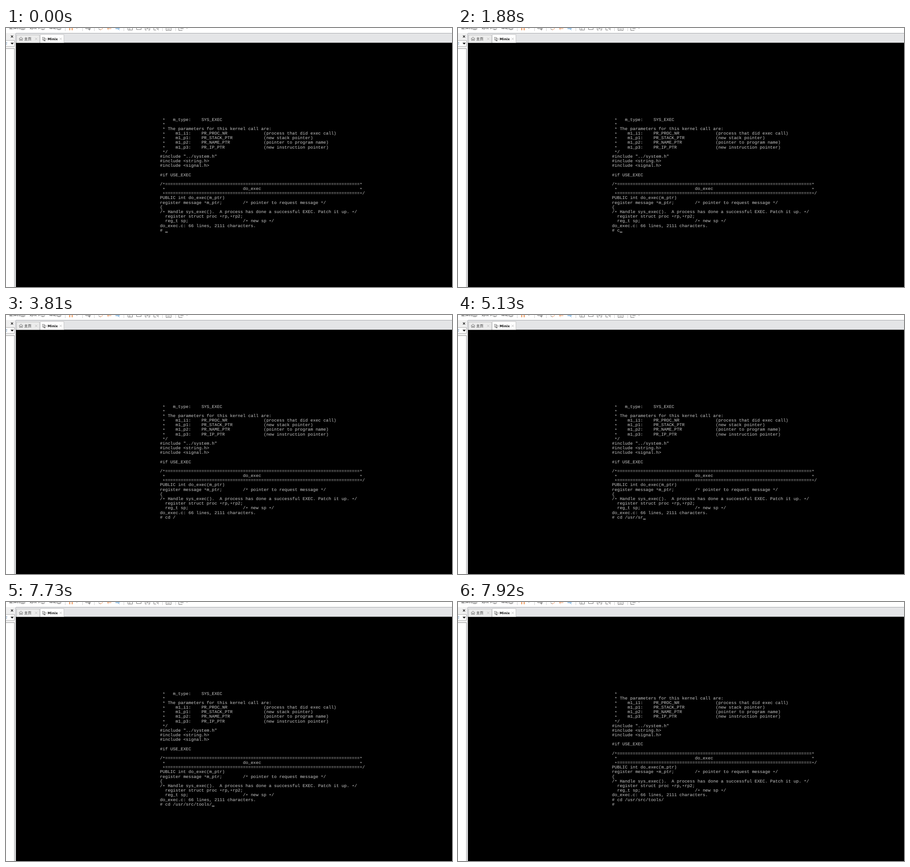
An HTML page for the animation above (8 s loop, 982 by 571 pixels).

```html
<!DOCTYPE html>
<html lang="zh">
<head>
<meta charset="utf-8">
<title>Terminal</title>
<style>
  html, body { margin: 0; width: 100%; height: 100%; overflow: hidden; background: #000; }
  svg { display: block; width: 100vw; height: 100vh; }
  text { white-space: pre; text-rendering: geometricPrecision; }
  #screen text { font: 9.525px "Liberation Mono", monospace; fill: #c8c8c8; }
  .ui { font: 8px "Noto Sans CJK SC", "Noto Sans CJK", sans-serif; fill: #222; }
  .tab { font: bold 7.6px "DejaVu Sans", sans-serif; fill: #111; }
  .line { fill: none; stroke: #777; stroke-width: 1; }
  .sep { stroke: #d0d0d0; }
  .orange { stroke: #ee9a62; }
  .blue { stroke: #3f8fd2; }
  .close { stroke: #bbb; }
</style>
</head>
<body>
<svg viewBox="0 0 982 571" preserveAspectRatio="none">
  <rect width="982" height="571"/>

  <!-- toolbar -->
  <rect width="982" height="12" fill="#fff"/>
  <g class="ui">
    <text x="7" y="2">虚拟机(<tspan text-decoration="underline">M</tspan>)</text>
    <text x="52" y="2">选项卡(<tspan text-decoration="underline">T</tspan>)</text>
    <text x="95" y="2">帮助(<tspan text-decoration="underline">H</tspan>)</text>
  </g>
  <path class="line sep" d="M130.500 0v7M168.500 0v7M194.500 0v7M259.500 0v7M344.500 0v7M373.500 0v7"/>
  <path d="M139 0h2.500v5h-2.500zM144.500 0h2.500v5h-2.500z" fill="#f0a46e"/>
  <path d="M154.500 0h3l-1.500 1.200zM397 0h3l-1.500 1.200z" fill="#777"/>
  <path class="line" d="M175.500 0v1.500h10V0M181 3h5M183.500 1v4.500M204 1q1 3 4 3"/>
  <path class="line orange" d="M207 4q5 0 5.500-4M223 1.500h9M226 0l-3 1.500 3 3"/>
  <path class="line blue" stroke-width="1.500" d="M241 1.500h6l4-1.500M246 1.500l4 3"/>
  <path class="line" d="M268.500 0v4.500h10V0M272.500 0v4M287.500 0v3.500h10V0M306.500 0v4.500h3M316.500 0v4.500h-3M309 1.500h5M325.500 0v4.500h5M331 0l5 5M335 0v3M352.500 0v5.500h11V0M355 2.500h6M380.500 0v5.500h8M384 1.500h7"/>

  <!-- tab strip -->
  <rect y="11" width="982" height="21.500" fill="#e4e5e7"/>
  <path class="line" stroke="#aaa" d="M20 11.500h962" style="stroke:#a5a8ab"/>
  <rect x="23.500" y="15.500" width="50" height="17" fill="#ececec" stroke="#c4c4c4"/>
  <rect x="75.500" y="14.500" width="52" height="18" fill="#fff" stroke="#c4c4c4"/>
  <path class="line" d="M28.500 24l4.500-4 4.500 4M30 23v4.500h2v-3h2v3h2V23"/>
  <path class="line" d="M83 20.500h-2.500v6h2M83.500 22v6.500h4"/>
  <path d="M84 21l5 3.500-5 3.500z" fill="#fff" stroke="#555" stroke-width=".9"/>
  <text class="ui" x="40" y="27">主页</text>
  <text class="tab" x="91.500" y="26.800" style="font-size:7.400px">Minix</text>
  <path class="line close" d="M64 21.500l5 5m0-5l-5 5M118 21.500l5 5m0-5l-5 5"/>

  <!-- side panel -->
  <rect y="11" width="22" height="560" fill="#e9e9eb"/>
  <rect y="11" width="19" height="35" fill="#f0f0f0"/>
  <path class="line" style="stroke:#222;stroke-width:1.200" d="M11 16.500l4.500 4.500m0-4.500l-4.500 4.500"/>
  <rect x="-2" y="27.500" width="20.500" height="13" fill="#fff" stroke="#b0b0b0"/>
  <text class="ui" x="-5" y="37" style="fill:#6a8fb5">索</text>
  <path d="M10 32.500h7l-3.500 4z" fill="#111"/>
  <rect x="-2" y="45.500" width="20.500" height="527" fill="#fff" stroke="#9a9a9a"/>
  <path class="line" style="stroke:#b4b6b8" d="M21.500 12v559"/>

  <g id="screen"></g>
  <rect id="cursor" y="449.300" width="5.700" height="1.400" fill="#c8c8c8"/>
</svg>
<script>
const LOOP = 8000, ENTER = 7860;
const LEFT = 339, TOP = 197, COL = 5.715, ROW = 10.17, BASE = 7.6;

const at = (text, col, rest) => text.padEnd(col) + rest;
const param = (name, reg, note) => at(` *    ${name}:    ${reg}`, 40, `(${note})`);
const bar = '='.repeat(75);

const listing = [
  ' *   m_type:    SYS_EXEC',
  ' *',
  ' * The parameters for this kernel call are:',
  param('m1_i1', 'PR_PROC_NR', 'process that did exec call'),
  param('m1_p1', 'PR_STACK_PTR', 'new stack pointer'),
  param('m1_p2', 'PR_NAME_PTR', 'pointer to program name'),
  param('m1_p3', 'PR_IP_PTR', 'new instruction pointer'),
  ' */',
  '#include "../system.h"',
  '#include <string.h>',
  '#include <signal.h>',
  '',
  '#if USE_EXEC',
  '',
  `/*${bar}*`,
  at(at(' *', 32, 'do_exec'), 77, '*'),
  ` *${bar}*/`,
  'PUBLIC int do_exec(m_ptr)',
  at('register message *m_ptr;', 32, '/* pointer to request message */'),
  '{',
  '/* Handle sys_exec().  A process has done a successful EXEC. Patch it up. */',
  '  register struct proc *rp,*rp2;',
  at('  reg_t sp;', 32, '/* new sp */'),
  'do_exec.c: 66 lines, 2111 characters.'
];

const command = 'cd /usr/src/tools/';
const keys = [1880, 2080, 2210, 2670, 4140, 4270, 4340, 4800, 4930,
  5130, 5260, 5660, 6200, 6600, 6730, 6930, 7000, 7340];
// The cursor starts visible and flips at each of these times.
const blinks = [200, 410, 610, 880, 1080, 1280, 1530, 1810, 2010, 2210,
  2470, 2670, 2930, 3130, 3400, 3600, 3810, 4080, 4340, 4540, 4740, 5000,
  5200, 5460, 5660, 5870, 6130, 6330, 6530, 6800, 7070, 7270, 7530, 7730, 7920];

const svg = (tag, parent) =>
  parent.appendChild(document.createElementNS('http://www.w3.org/2000/svg', tag));
const screen = document.getElementById('screen');
const cursor = document.getElementById('cursor');
const rows = Array.from({ length: 25 }, (_, i) => {
  const row = svg('text', screen);
  row.setAttribute('x', LEFT);
  row.setAttribute('y', TOP + i * ROW + BASE);
  return row;
});

// Asterisks sit at mid-height in the console font.
function write(row, line) {
  if (row.line === line) return;
  row.line = line;
  row.textContent = '';
  let low = 0;
  for (const part of line.split(/(\*+)/).filter(Boolean)) {
    const drop = part[0] === '*' ? 1.5 : 0;
    const span = svg('tspan', row);
    span.setAttribute('dy', drop - low);
    span.textContent = part;
    low = drop;
  }
}

const passed = (times, t) => times.filter(time => time <= t).length;

function draw(t) {
  const done = t >= ENTER;
  const typed = '# ' + command.slice(0, passed(keys, t));
  const lines = done ? [...listing.slice(1), typed, '# '] : [...listing, typed];
  rows.forEach((row, i) => write(row, lines[i]));
  cursor.setAttribute('x', LEFT + lines[24].length * COL);
  cursor.setAttribute('visibility', passed(blinks, t) % 2 ? 'hidden' : 'visible');
}

const start = performance.now();
function tick() {
  draw((performance.now() - start) % LOOP);
  requestAnimationFrame(tick);
}
tick();
</script>
</body>
</html>
```
